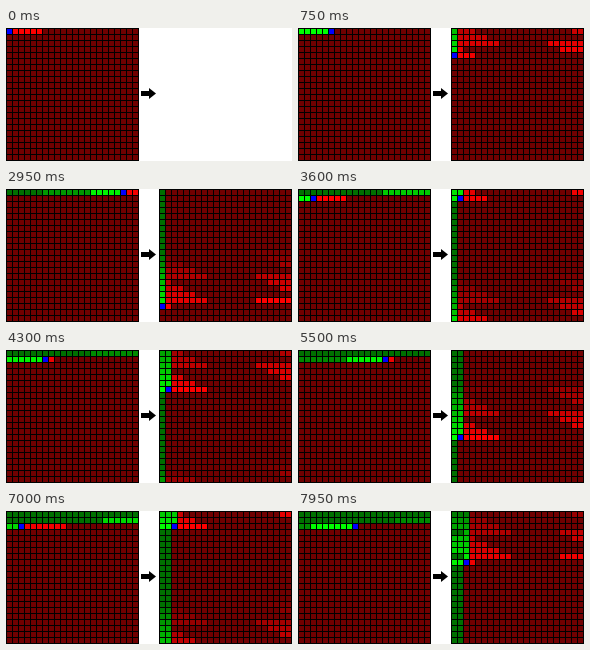
Recreate the animation shown at these times as a matplotlib script. Size 286 by 133 pixels, loop 8000 ms.

```python
"""Matrix transposition: row-wise reads, column-wise writes, and the LRU cache lines they touch."""
import numpy as np
import matplotlib.pyplot as plt
from matplotlib.animation import FuncAnimation
from matplotlib.patches import Polygon

W, H, DPI = 286, 133, 100
N = 22            # matrix side
PITCH = 6         # cell plus grid line
LINE = 8          # elements per cache line
SLOTS = 11        # cache lines kept
SRC_SHIFT, DST_SHIFT = 2, 4   # memory alignment of each matrix
DIM, FULL = 112, 255
FRAMES, INTERVAL = 160, 50

addr = np.arange(N * N)
src_order = addr
dst_order = (addr % N) * N + addr // N    # step <-> address, its own inverse
src_lines = (addr + SRC_SHIFT) // LINE
dst_lines = (addr + DST_SHIFT) // LINE


def cache_after(reads, writes):
    """Cache lines, most recently used first."""
    cache = []

    def touch(key):
        if key in cache:
            cache.remove(key)
        cache.insert(0, key)
        del cache[SLOTS:]

    for k in range(reads + 1):
        touch(("src", src_lines[k]))
        if k <= writes:
            touch(("dst", dst_lines[dst_order[k]]))
    return cache


def paint(name, lines, order, step, cache):
    """RGB image of one matrix with its grid."""
    level = np.full(N * N, DIM)
    for rank, (owner, line) in enumerate(cache):
        if owner == name:
            level[lines == line] = round(FULL - (FULL - DIM) * rank / SLOTS)
    cells = np.zeros((N * N, 3), np.uint8)
    done = order < step
    cells[done, 1] = level[done]
    cells[~done, 0] = level[~done]
    cells[order == step] = (0, 0, 255)

    img = np.zeros((H, H, 3), np.uint8)
    big = cells.reshape(N, N, 3).repeat(PITCH, 0).repeat(PITCH, 1)
    img[:-1, :-1] = big
    img[::PITCH] = 0
    img[:, ::PITCH] = 0
    return img


fig = plt.figure(figsize=(W / DPI, H / DPI), dpi=DPI, facecolor="white")
ax = fig.add_axes([0, 0, 1, 1])
ax.axis("off")


def panel(x):
    return ax.imshow(np.full((H, H, 3), 255, np.uint8), extent=(x, x + H, H, 0),
                     interpolation="nearest", aspect="auto")


src_img, dst_img = panel(0), panel(W - H)
ax.add_patch(Polygon([(135, 63), (143, 63), (143, 60), (150, 65.5), (143, 71),
                      (143, 68), (135, 68)], facecolor="black", lw=0))
ax.set_xlim(0, W)
ax.set_ylim(H, 0)


def update(i):
    reads, writes = i // 3, (i + 1) // 3 - 1
    cache = cache_after(reads, writes)
    src_img.set_data(paint("src", src_lines, src_order, reads, cache))
    if writes < 0:
        dst_img.set_data(np.full((H, H, 3), 255, np.uint8))
    else:
        dst_img.set_data(paint("dst", dst_lines, dst_order, writes, cache))
    return src_img, dst_img


anim = FuncAnimation(fig, update, frames=FRAMES, interval=INTERVAL,
                     repeat=True, repeat_delay=0)
plt.show()
```
